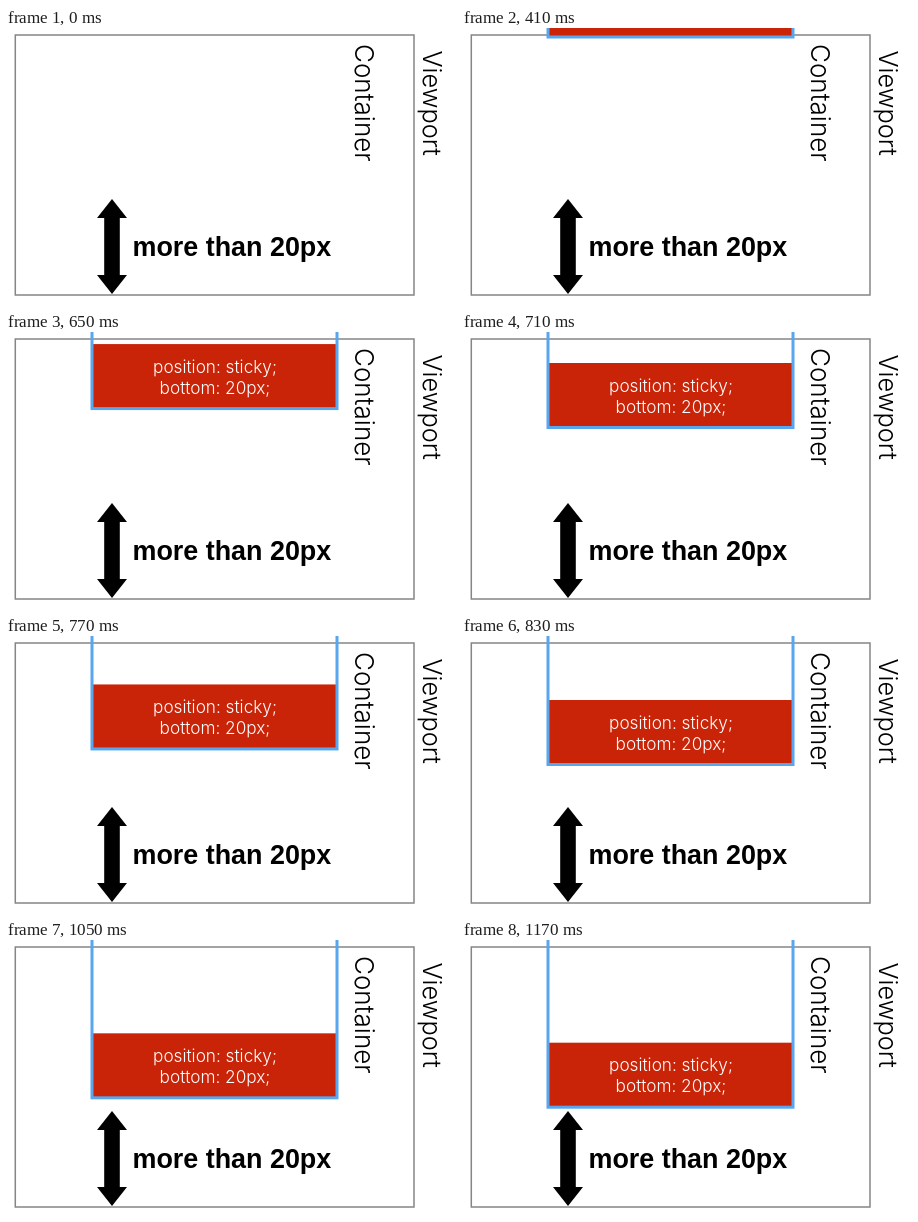
An HTML page that plays this animation: 450x276 px, repeating every 2.21 s.

```html
<!DOCTYPE html>
<html lang="en">
<head>
<meta charset="utf-8">
<title>Sticky bottom</title>
<style>
  html, body { margin: 0; width: 100%; height: 100%; overflow: hidden; background: #fff; }
  svg { display: block; width: 100%; height: 100%; }
  .light { font-family: Inter, "Liberation Sans", sans-serif; font-weight: 300; }
  .inner { font-size: 26px; }
  .outer { font-size: 25.4px; }
  .code { font-size: 17.2px; fill: #fff; text-anchor: middle; }
  .bold { font: bold 26.9px "Liberation Sans", Arial, sans-serif; }
</style>
</head>
<body>
<svg viewBox="0 0 450 276">
  <rect x="9.3" y="7" width="398.7" height="260" fill="none" stroke="#858585" stroke-width="1.5"/>
  <text class="light inner" transform="translate(349 16) rotate(90)">Container</text>
  <text class="light outer" transform="translate(417.2 22.5) rotate(90)">Viewport</text>
  <path d="M106 171L121 190H113.8V247H121L106 266L91 247H98.2V190H91Z"/>
  <text class="bold" x="126.5" y="227.5">more than 20px</text>
  <!-- the origin of this group is the bottom edge of the box -->
  <g id="box">
    <rect x="86" y="-66" width="245" height="65" fill="#c92408"/>
    <rect x="86" y="-301.5" width="245" height="300" fill="none" stroke="#58a6ee" stroke-width="3"/>
    <text class="light code" x="209" y="-37.5">position: sticky;</text>
    <text class="light code" x="209" y="-16.5">bottom: 20px;</text>
  </g>
</svg>
<script>
const LOOP = 2210, START = 410, SLOW = 950, END = 1170;
const box = document.getElementById('box');

// time and bottom edge
const keys = [[START, 10.5], [530, 40], [710, 97], [830, 130], [SLOW, 154], [END, 168.7]];

const slope = i => {
  if (i === 0) return 0.235;
  if (i === keys.length - 1) return 0;
  const [a, b] = [keys[i - 1], keys[i + 1]];
  return (b[1] - a[1]) / (b[0] - a[0]);
};

// cubic Hermite curve through the keys
function edge(t) {
  if (t >= END) return keys[keys.length - 1][1];
  const i = keys.findIndex((k, n) => t >= k[0] && t < keys[n + 1][0]);
  const [t0, y0] = keys[i], [t1, y1] = keys[i + 1];
  const d = t1 - t0, u = (t - t0) / d, v = 1 - u;
  return v * v * ((1 + 2 * u) * y0 + u * d * slope(i))
       + u * u * ((1 + 2 * v) * y1 - v * d * slope(i + 1));
}

// the box moves in visible steps: 60 ms, later alternating 50 and 60 ms
function hold(t) {
  if (t < SLOW) return t - (t - START) % 60;
  const r = (t - SLOW) % 110;
  return t - r + (r < 50 ? 0 : 50);
}

function draw(t) {
  const shown = t >= START;
  box.setAttribute('visibility', shown ? 'visible' : 'hidden');
  if (shown) box.setAttribute('transform', `translate(0 ${edge(hold(t)).toFixed(2)})`);
}

const origin = performance.now();
function tick() {
  draw((performance.now() - origin) % LOOP);
  requestAnimationFrame(tick);
}
draw(0);
requestAnimationFrame(tick);
</script>
</body>
</html>
```
